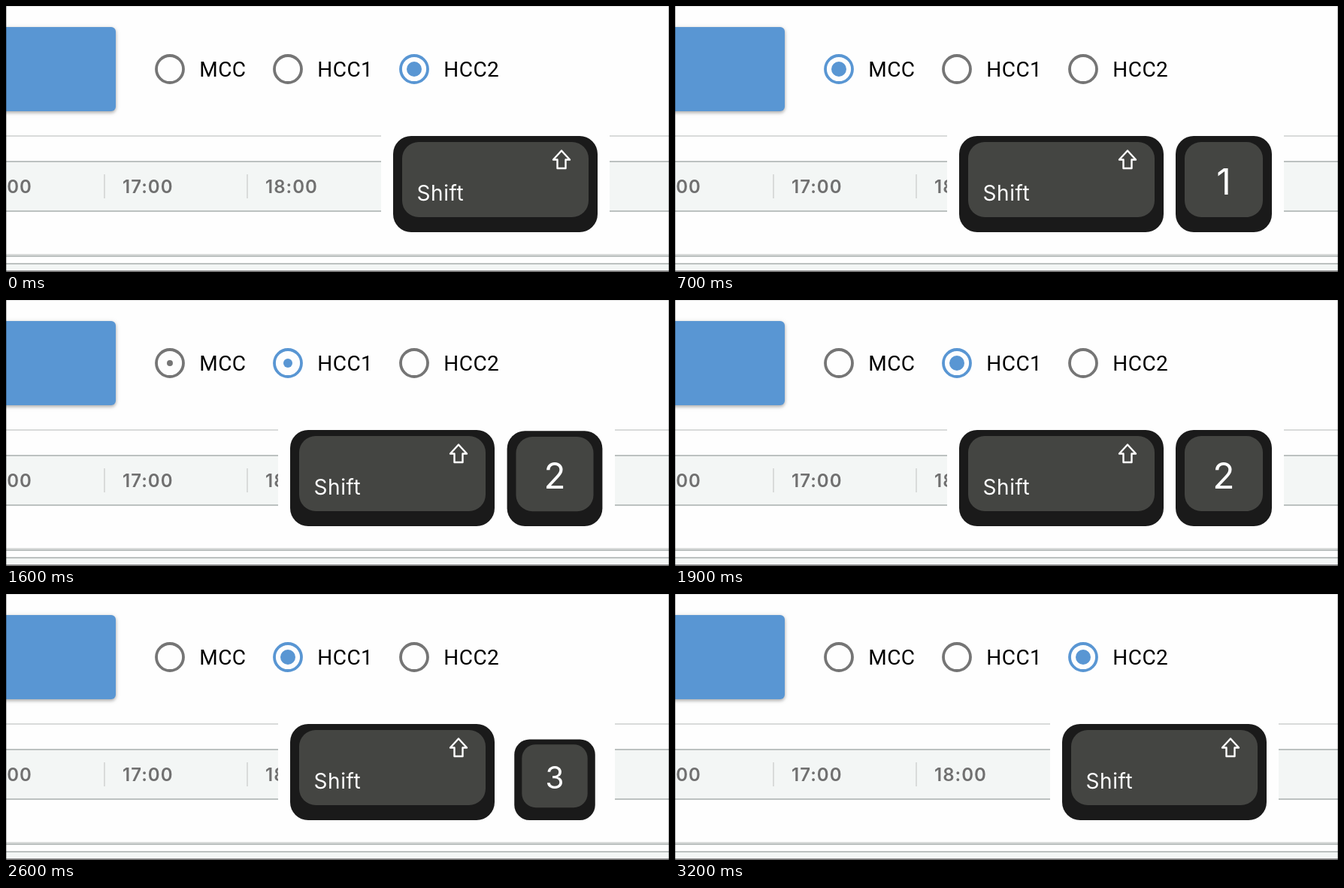
An HTML page that plays this animation: 882 by 354 pixels, repeating every 3700 ms.

```html
<!DOCTYPE html>
<html lang="en">
<head>
<meta charset="utf-8">
<title>Keyboard shortcuts for radio buttons</title>
<style>
  html, body { margin: 0; width: 100%; height: 100%; overflow: hidden; background: #fefefe; }
  svg { display: block; width: 882px; height: 354px; }
  .button {
    fill: #5996d3;
    filter: drop-shadow(0 2px 2px rgba(0, 0, 0, .26)) drop-shadow(0 1px 3px rgba(0, 0, 0, .12));
  }
  .label { font: 400 28px Roboto, sans-serif; letter-spacing: .5px; }
  .hour { font: 600 24px Inter, sans-serif; letter-spacing: 1px; fill: #707070; }
  .radio { color: #757575; }
  .radio.on { color: #5996d3; }
  .ring { fill: none; stroke: currentColor; stroke-width: 3.8; }
  .dot { fill: currentColor; }
  .band { fill: #f3f6f5; }
  .line { fill: #bcc1c0; }
  .faint { fill: #d9dbda; }
  .pad { fill: #fefefe; }
  .base { fill: #1a1a1a; }
  .cap { fill: #444542; }
  .name { font: 400 28px Inter, sans-serif; letter-spacing: .6px; fill: #fff; }
  .digit { font: 400 48px Inter, sans-serif; fill: #fff; text-anchor: middle; }
  .arrow { fill: none; stroke: #fff; stroke-width: 2.4; stroke-linejoin: round; }
</style>
</head>
<body>
<svg viewBox="0 0 882 354">
  <rect class="pad" width="882" height="354"/>
  <rect class="button" x="-20" y="28" width="166" height="112" rx="6"/>
  <g id="radios"></g>

  <rect class="faint" y="172" width="882" height="2"/>
  <rect class="band" y="207" width="882" height="66"/>
  <rect class="line" y="206" width="882" height="2"/>
  <rect class="line" y="272" width="882" height="2"/>
  <rect class="faint" x="130" y="224" width="2" height="32"/>
  <rect class="faint" x="320" y="224" width="2" height="32"/>
  <text class="hour" x="-35" y="249">16:00</text>
  <text class="hour" x="155" y="249">17:00</text>
  <text class="hour" x="345" y="249">18:00</text>

  <rect class="faint" y="330" width="882" height="2"/>
  <rect class="line" y="332" width="882" height="2"/>
  <rect class="band" y="343" width="882" height="11"/>
  <rect class="line" y="342" width="882" height="2"/>
  <rect y="352" width="882" height="2" fill="#7d7d7d"/>

  <rect class="pad" id="pad" y="157" height="160"/>
  <g id="shift">
    <rect class="base" y="173" width="272" height="128" rx="24"/>
    <rect class="cap" x="12" y="181" width="248" height="100" rx="22"/>
    <text class="name" x="31.5" y="259">Shift</text>
    <path class="arrow" d="M224 192.5 L235 204.5 H229.5 V216 H218.5 V204.5 H213 Z"/>
  </g>
  <g id="key">
    <rect class="base" x="-64" y="-128" width="128" height="128" rx="24"/>
    <rect class="cap" x="-52" y="-120" width="104" height="100" rx="22"/>
    <text class="digit" id="digit" y="-50"></text>
  </g>

  <g fill="#000">
    <rect width="882" height="1" opacity=".1"/>
    <rect width="1" height="354" opacity=".28"/>
    <rect x="881" width="1" height="354" opacity=".28"/>
  </g>
</svg>
<script>
  const LOOP = 3700, STEP = 100, SWITCH = 280;
  const options = [
    { name: 'MCC', x: 218 },
    { name: 'HCC1', x: 375 },
    { name: 'HCC2', x: 543 }
  ];
  // Key visible from show to hide; the radio reacts at pick.
  const presses = [
    { show: 500, hide: 1100, pick: 456 },
    { show: 1600, hide: 2200, pick: 1526 },
    { show: 2600, hide: 3200, pick: 2630 }
  ];

  const el = id => document.getElementById(id);
  const clamp = v => Math.min(1, Math.max(0, v));
  const easeOut = v => 1 - (1 - clamp(v)) ** 3;

  el('radios').innerHTML = options.map(({ name, x }) => `
    <g class="radio">
      <circle class="ring" cx="${x}" cy="84" r="18"/>
      <circle class="dot" cx="${x}" cy="84"/>
    </g>
    <text class="label" x="${x + 39.2}" y="93.5">${name}</text>`).join('');
  const radios = [...document.querySelectorAll('.radio')];

  function drawRadios(t) {
    let current = 2, previous = 2, progress = 1;
    presses.forEach(({ pick }, i) => {
      if (t <= pick) return;
      previous = current;
      current = i;
      progress = easeOut((t - pick) / SWITCH);
    });
    radios.forEach((radio, i) => {
      const size = i === current ? progress : i === previous ? 1 - progress : 0;
      radio.classList.toggle('on', i === current);
      radio.querySelector('.dot').setAttribute('r', 10 * size);
    });
  }

  function drawKeys(t) {
    const i = presses.findIndex(p => t >= p.show && t < p.hide);
    const pressed = i >= 0;
    el('shift').setAttribute('transform', `translate(${pressed ? 378 : 515} 0)`);
    el('pad').setAttribute('x', pressed ? 362 : 499);
    el('pad').setAttribute('width', pressed ? 448 : 304);
    el('key').style.display = pressed ? '' : 'none';
    if (!pressed) return;
    const scale = Math.min(1, .84 + .00145 * (t - presses[i].pick + 30));
    el('key').setAttribute('transform', `translate(730 301) scale(${scale})`);
    el('digit').textContent = i + 1;
  }

  function draw(now) {
    const t = Math.floor((now % LOOP) / STEP) * STEP;
    drawRadios(t);
    drawKeys(t);
  }

  const start = performance.now();
  function tick() {
    draw(performance.now() - start);
    requestAnimationFrame(tick);
  }
  tick();
</script>
</body>
</html>
```
